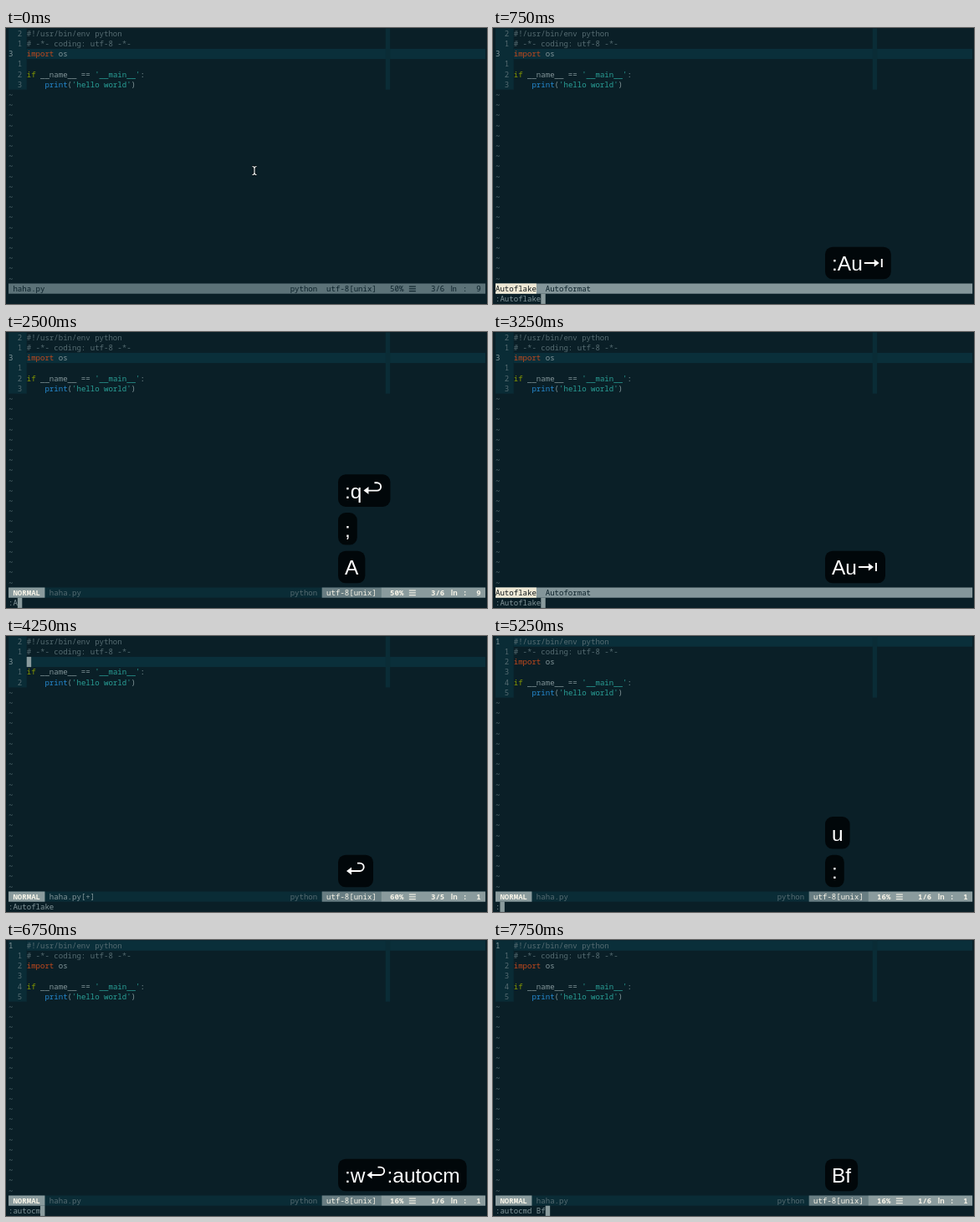
Recreate the animation shown at these times as an HTML page with a canvas. Size 575 by 330 pixels, loop 8000 ms.

```html
<!DOCTYPE html>
<html>
<head>
<meta charset="utf-8">
<style>
  html, body { margin: 0; width: 100%; height: 100%; overflow: hidden; background: #0a1f27; }
  canvas { display: block; }
</style>
</head>
<body>
<canvas id="stage" width="575" height="330"></canvas>
<script>
const ctx = document.getElementById('stage').getContext('2d');
const CELL = 5.43, ROW = 12.2, LEFT = 3, TOP = 0.5, COLS = 105, LOOP = 8000;
const MONO = '9.05px "Noto Sans Mono", monospace';
const SANS = '24.5px "Liberation Sans", Arial, sans-serif';
const C = {
  bg: '#0a1f27', panel: '#0a2c36', line: '#0a2f3a', dim: '#566c72', text: '#83969a',
  bar: '#5c7278', mid: '#687d82', light: '#8a9b9d', white: '#f7f4e8', dark: '#0a2029',
  red: '#d0362d', orange: '#c1491d', green: '#859900', blue: '#268bd2',
  cyan: '#2aa198', yellow: '#ae8608'
};

const HEAD = [[['#!/usr/bin/env python', C.dim]], [['# -*- coding: utf-8 -*-', C.dim]]];
const IMPORT = [['import', C.orange], [' os', C.text]];
const MAIN = [
  [['if', C.green], [' __name__ == ', C.text], ["'__main__'", C.cyan], [':', C.text]],
  [['    print', C.blue], ['(', C.text], ["'hello world'", C.cyan], [')', C.text]]
];
const FULL = [...HEAD, IMPORT, [], ...MAIN];
const CLEAN = [...HEAD, [], ...MAIN];
const DIFF = [
  ['--- original//Users/tangyuemiao/haha.py', C.yellow],
  ['+++ fixed//Users/tangyuemiao/haha.py', C.yellow],
  ['@@ -1,6 +1,5 @@', C.blue],
  [' #!/usr/bin/env python', C.text],
  [' # -*- coding: utf-8 -*-', C.text],
  ['-import os', C.red],
  ['', C.text],
  [" if __name__ == '__main__':", C.text],
  ["     print('hello world')", C.text],
  ['', C.text]
];

// Each step changes only the listed properties.
const steps = [
  [0, { doc: FULL, row: 2, col: 9, pos: '50%', name: 'haha.py', active: false, diff: false,
        wild: false, cmd: '', cursor: '', keys: [], fade: 1, mouse: true }],
  [250, { active: true, cmd: ':', cursor: 'cmd', keys: [':'], mouse: false }],
  [500, { cmd: ':Au', keys: [':Au'] }],
  [750, { cmd: ':Autoflake', keys: [':Au⇥'], wild: true }],
  [1000, { cmd: ':Autoflake!', keys: [':Au⇥!'], wild: false }],
  [1250, { keys: [':Au⇥!↩'], diff: true, cursor: 'text' }],
  [1500, { cmd: ':', cursor: 'cmd', keys: [':Au⇥!↩', ':'] }],
  [1750, { cmd: ':q', keys: [':Au⇥!↩', ':q'], fade: 0.82 }],
  [2000, { keys: [':q↩'], fade: 1, diff: false, cursor: 'text' }],
  [2250, { cmd: ':', cursor: 'cmd', keys: [':q↩', ';'] }],
  [2500, { cmd: ':A', keys: [':q↩', ';', 'A'] }],
  [2750, { cmd: ':Au', keys: [':q↩', ';', 'Au'] }],
  [3000, { cmd: ':Autoflake', keys: [';', 'Au⇥'], wild: true }],
  [3250, { keys: ['Au⇥'] }],
  [4000, { keys: ['↩'], wild: false, cursor: 'text', doc: CLEAN, col: 1, pos: '60%', name: 'haha.py[+]' }],
  [4750, { keys: ['u'], cmd: '', doc: FULL, row: 0, pos: '16%', name: 'haha.py' }],
  [5250, { cmd: ':', cursor: 'cmd', keys: ['u', ':'] }],
  [5500, { cmd: ':w', keys: [':w'] }],
  [5750, { cursor: 'text', keys: [':w↩'] }],
  [6000, { cmd: ':', cursor: 'cmd', keys: [':w↩:'] }],
  [6250, { cmd: ':au', keys: [':w↩:au'] }],
  [6500, { cmd: ':auto', keys: [':w↩:auto'] }],
  [6750, { cmd: ':autocm', keys: [':w↩:autocm'] }],
  [7000, { cmd: ':autocmd ', keys: [':w↩:autocmd'] }],
  [7250, { fade: 0.6 }],
  [7500, { cmd: ':autocmd B', keys: ['B'], fade: 1 }],
  [7750, { cmd: ':autocmd Bf', keys: ['Bf'] }]
];

const x = col => LEFT + col * CELL;
const y = row => TOP + row * ROW;

function fill(col, row, cols, rows, color) {
  ctx.fillStyle = color;
  ctx.fillRect(x(col), y(row), cols * CELL, rows * ROW);
}

function write(text, col, row, color, bold) {
  ctx.font = (bold ? 'bold ' : '') + MONO;
  ctx.fillStyle = color;
  ctx.fillText(text, x(col), y(row) + 9.2);
}

function tildes(from, to) {
  for (let r = from; r < to; r++) write('~', 0, r, C.dim);
}

function drawDocument(s, bottom) {
  const n = s.doc.length;
  fill(0, 0, 4, n, C.panel);
  if (!s.diff) fill(4, s.row, COLS - 4, 1, C.line);
  fill(83, 0, 1, n, C.panel);
  s.doc.forEach((parts, r) => {
    const here = r === s.row;
    write(here ? String(r + 1) : String(Math.abs(r - s.row)).padStart(3), 0, r, here ? C.text : C.dim);
    let col = 4;
    for (const [text, color] of parts) {
      write(text, col, r, color);
      col += text.length;
    }
  });
  tildes(n, bottom);
  if (s.cursor === 'text' && !s.diff) {
    fill(3 + s.col, s.row, 1, 1, C.light);
    const line = s.doc[s.row].map(p => p[0]).join('');
    write(line[s.col - 1] || '', 3 + s.col, s.row, C.dark);
  }
}

function drawDiff(s) {
  fill(0, 22, COLS, 1, C.line);
  fill(79, 13, 1, 10, C.panel);
  DIFF.forEach(([text, color], i) => write(text, 0, 13 + i, color));
  tildes(23, 25);
  if (s.cursor === 'text') fill(0, 22, 1, 1, C.light);
}

function drawStatus(row, active, name, type, percent, place, column) {
  const shift = place.length > 4 ? 1 : 0;
  const ink = active ? C.white : C.dark;
  fill(0, row, COLS, 1, active ? C.panel : C.bar);
  if (active) {
    fill(0, row, 8, 1, C.light);
    fill(69 - shift, row, 13, 1, C.mid);
    fill(82 - shift, row, 23 + shift, 1, C.light);
    write('NORMAL', 1, row, C.white, true);
  }
  const faint = active ? C.dim : C.dark;
  write(name, active ? 9 : 1, row, active && name.includes('+') ? C.text : faint);
  write(type, 68 - shift - type.length, row, faint);
  write('utf-8[unix]', 70 - shift, row, ink);
  write(percent, 87 - shift - percent.length, row, ink, active);
  for (let i = 0; i < 3; i++) ctx.fillRect(x(88 - shift) + 1, y(row) + 3 + i * 2.8, 8, 1.1);
  write(place, 96 - place.length, row, ink, active);
  ctx.font = (active ? 'bold ' : '') + '9px "Liberation Sans", sans-serif';
  ctx.fillText('ln', x(97) + 2, y(row) + 9.2);
  write(':', 100, row, ink, active);
  write(String(column), 103, row, ink, active);
}

function drawWildmenu() {
  fill(0, 25, COLS, 1, '#84969a');
  fill(0, 25, 9, 1, '#eee8d5');
  write('Autoflake', 0, 25, '#10181b');
  write('Autoformat', 11, 25, C.dark);
}

function arrowHead(px, py, dir) {
  ctx.beginPath();
  ctx.moveTo(px, py);
  ctx.lineTo(px - dir * 6, py - 4.5);
  ctx.lineTo(px - dir * 6, py + 4.5);
  ctx.fill();
}

function drawTab(px, py) {
  ctx.beginPath();
  ctx.moveTo(px + 2, py);
  ctx.lineTo(px + 16, py);
  ctx.moveTo(px + 23, py - 5);
  ctx.lineTo(px + 23, py + 5);
  ctx.stroke();
  arrowHead(px + 20, py, 1);
}

function drawReturn(px, py) {
  ctx.beginPath();
  ctx.moveTo(px + 6, py);
  ctx.lineTo(px + 18, py);
  ctx.arc(px + 18, py - 4.7, 4.7, Math.PI / 2, -Math.PI / 2, true);
  ctx.lineTo(px + 15, py - 9.4);
  ctx.stroke();
  arrowHead(px + 2, py, -1);
}

function drawKeys(keys, fade) {
  const icons = { '⇥': drawTab, '↩': drawReturn };
  ctx.font = SANS;
  ctx.lineWidth = 1.9;
  const advance = ch => icons[ch] ? 26 : ctx.measureText(ch).width;
  keys.forEach((text, i) => {
    const top = 261.7 - (keys.length - 1 - i) * 45.7;
    const width = [...text].reduce((sum, ch) => sum + advance(ch), 16);
    ctx.globalAlpha = i ? 1 : fade;
    ctx.fillStyle = 'rgba(0,4,6,.88)';
    ctx.beginPath();
    ctx.roundRect(397, top, width, 38.6, 9);
    ctx.fill();
    ctx.fillStyle = ctx.strokeStyle = '#fff';
    let px = 405;
    for (const ch of text) {
      if (icons[ch]) icons[ch](px, top + 19.3);
      else ctx.fillText(ch, px, top + 28.6);
      px += advance(ch);
    }
  });
  ctx.globalAlpha = 1;
}

function drawMouse() {
  ctx.beginPath();
  for (const side of [-1, 1]) {
    ctx.moveTo(297 + side * 2.5, 165.5);
    ctx.quadraticCurveTo(297, 165.5, 297, 168);
    ctx.lineTo(297, 173);
    ctx.quadraticCurveTo(297, 175.5, 297 + side * 2.5, 175.5);
  }
  ctx.lineWidth = 3;
  ctx.strokeStyle = '#050c0f';
  ctx.stroke();
  ctx.lineWidth = 1.2;
  ctx.strokeStyle = '#e8eeee';
  ctx.stroke();
}

function draw(time) {
  const s = Object.assign({}, ...steps.filter(([at]) => at <= time).map(([, change]) => change));
  ctx.fillStyle = C.bg;
  ctx.fillRect(0, 0, 575, 330);
  drawDocument(s, s.diff ? 12 : 25);
  const place = `${s.row + 1}/${s.doc.length}`;
  if (s.diff) {
    drawDiff(s);
    drawStatus(12, false, s.name, 'python', s.pos, place, s.col);
    drawStatus(25, true, 'autoflake[-]', 'diff', '100%', '10/10', 1);
  } else if (s.wild) {
    drawWildmenu();
  } else {
    drawStatus(25, s.active, s.name, 'python', s.pos, place, s.col);
  }
  write(s.cmd, 0, 26, C.text);
  if (s.cursor === 'cmd') fill(s.cmd.length, 26, 1, 1, C.light);
  drawKeys(s.keys, s.fade);
  if (s.mouse) drawMouse();
}

const start = performance.now();
function tick() {
  draw((performance.now() - start) % LOOP);
  requestAnimationFrame(tick);
}
tick();
</script>
</body>
</html>
```
